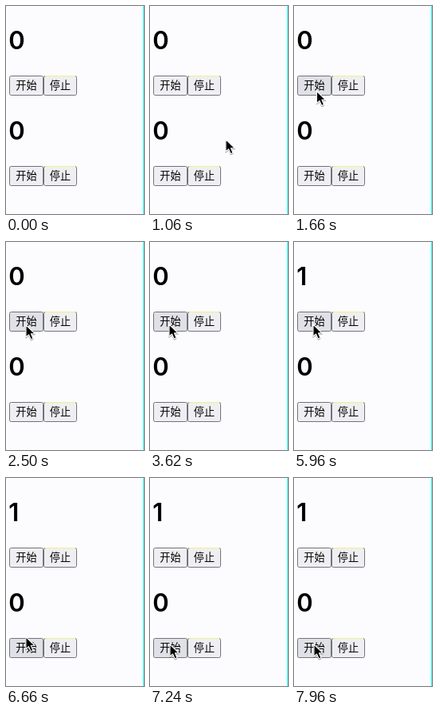
An HTML page for the animation above (8000 ms loop, 173 px wide and 260 px high).

```html
<!DOCTYPE html>
<html lang="zh">
<head>
<meta charset="utf-8">
<title>计数</title>
<style>
html, body { margin: 0; width: 100%; height: 100%; overflow: hidden; background: #fcfcff; }
svg { display: block; width: 173px; height: 260px; }
.count { font: 600 31px Inter, "Liberation Sans", sans-serif; fill: #000; }
.label { font: 500 13.2px "Noto Sans CJK SC", "Noto Sans CJK", sans-serif; fill: #000; text-anchor: middle; }
.button { fill: #efeff3; stroke: #73737a; }
.button.over { fill: #e0e0e7; }
.shine { stroke: #f0f08c; }
#cursor { filter: drop-shadow(.5px 1px .6px #0006); }
</style>
</head>
<body>
<svg viewBox="0 0 173 260">
  <rect width="173" height="260" fill="#fcfcff"/>
  <rect x="172" width="1" height="260" fill="#00ffff"/>
  <g id="page"></g>
  <path id="cursor" d="M0 0V15.2L3.5 12 6.2 18 9 16.8 6.4 10.9H11.2Z"
        fill="#000" stroke="#fff" stroke-width="1.1" stroke-linejoin="round"/>
</svg>
<script>
const LOOP = 8000;
const COUNT_AT = 5860;

const entry = { x: 190, y: 253 };
const moves = [
  { start: 760, end: 1600, x: 28.5, y: 106.5 },
  { start: 2100, end: 2860, x: 24, y: 103 },
  { start: 6240, end: 6840, x: 25, y: 208 }
];

const page = document.getElementById("page");
const cursor = document.getElementById("cursor");
const easeOut = k => 1 - (1 - k) ** 2;
const clamp = k => Math.min(1, Math.max(0, k));

function add(tag, attrs, text = "") {
  const el = document.createElementNS("http://www.w3.org/2000/svg", tag);
  for (const key in attrs) el.setAttribute(key, attrs[key]);
  el.textContent = text;
  return page.appendChild(el);
}

function button(x, y, w, text) {
  const box = add("rect", { class: "button", x: x + .5, y: y + .5, width: w - 1, height: 24, rx: 2 });
  add("text", { class: "label", x: x + w / 2, y: y + 17 }, text);
  return box;
}

function counter(y) {
  const top = y + 87;
  const count = add("text", { class: "count", x: 3.2, y: y + 54.2 }, "0");
  const start = button(4, top, 43, "开始");
  button(47, top, 42, "停止");
  add("path", { class: "shine", d: `M49 ${top + .5}h38` });
  return { count, start, top };
}

const counters = [counter(0), counter(113)];

function pointer(t) {
  let { x, y } = entry;
  for (const m of moves) {
    const k = easeOut(clamp((t - m.start) / (m.end - m.start)));
    x += (m.x - x) * k;
    y += (m.y - y) * k;
  }
  return { x, y };
}

function draw(t) {
  const { x, y } = pointer(t);
  cursor.setAttribute("transform", `translate(${x} ${y})`);
  for (const c of counters) {
    const over = x >= 4 && x < 47 && y >= c.top - 2 && y < c.top + 25;
    c.start.classList.toggle("over", over);
  }
  counters[0].count.textContent = t < COUNT_AT ? "0" : "1";
}

function tick() {
  draw(performance.now() % LOOP);
  requestAnimationFrame(tick);
}
tick();
</script>
</body>
</html>
```
